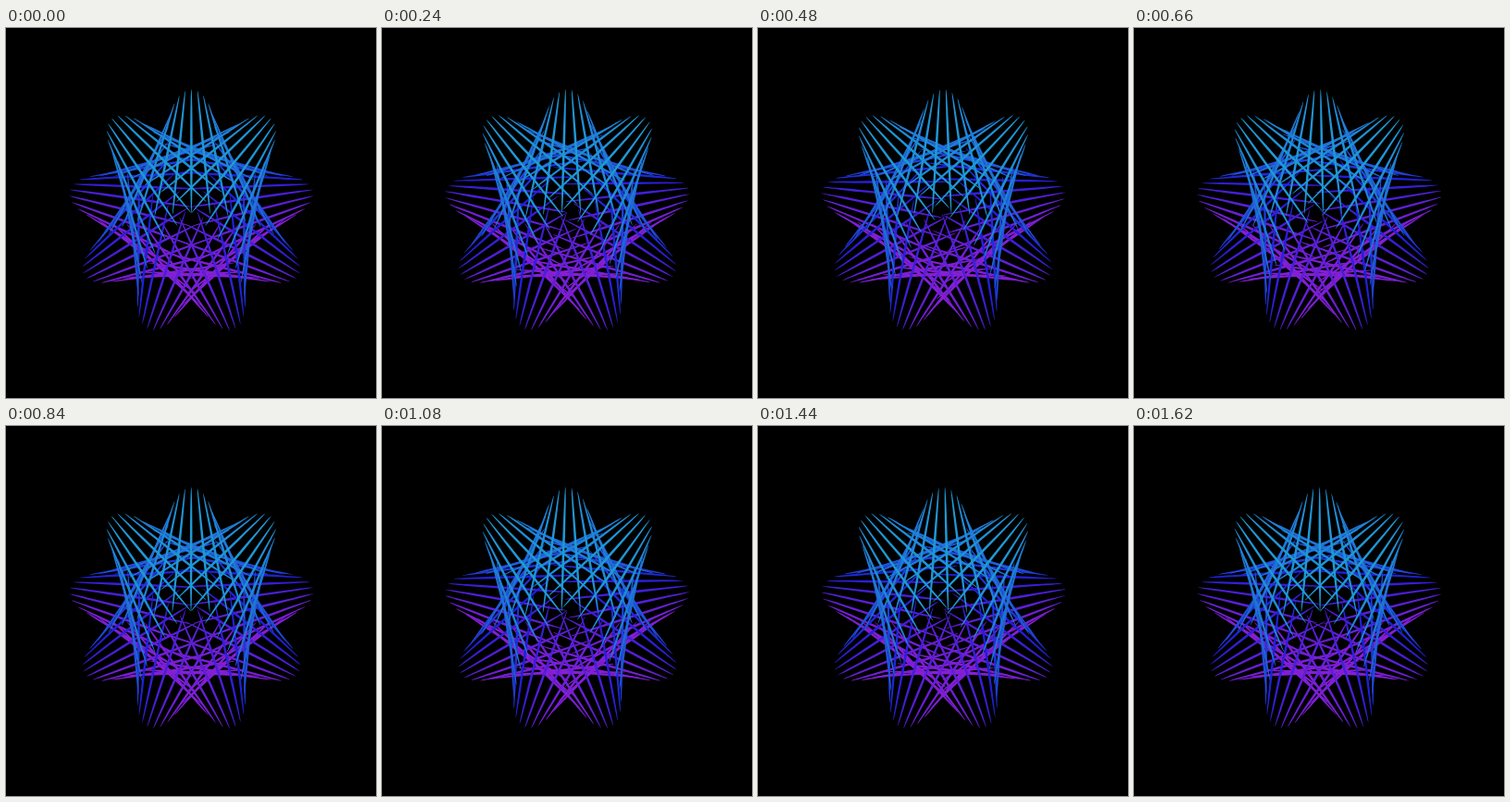
Animation, 400 px wide and 400 px high, one loop 1650 ms. Source, as an HTML page with a canvas:

```html
<!DOCTYPE html>
<html>
<head>
<meta charset="utf-8">
<style>
html, body { margin: 0; width: 100%; height: 100%; overflow: hidden; background: #000; }
canvas { display: block; width: 400px; height: 400px; }
</style>
</head>
<body>
<canvas id="stage" width="400" height="400"></canvas>
<script>
const ctx = document.getElementById('stage').getContext('2d');
const LOOP = 1650;
const STEP = 30;
const HALF = 67;           // half needle length, also the radius of its orbit
const THICK = 1.3;         // half needle thickness
const PER_LAYER = 31;
const SPACING = 360 / PER_LAYER;
const LAYER_TURNS = [-40, 40, 0];
const rad = deg => deg * Math.PI / 180;

// Signed angle in (-180, 180]
const wrap = deg => deg - 360 * Math.ceil((deg - 180) / 360);

function drawNeedle({ orbit, turn }) {
  const hue = 237 - 37 * Math.cos(rad(orbit));
  ctx.save();
  ctx.rotate(rad(turn + orbit));
  ctx.translate(0, -HALF);
  ctx.rotate(rad(-1.5 * orbit));   // counter-spin at half the orbit speed
  ctx.fillStyle = `hsl(${hue}, 75%, 48%)`;
  ctx.beginPath();
  ctx.ellipse(0, 0, THICK, HALF, 0, 0, 2 * Math.PI);
  ctx.fill();
  ctx.restore();
}

function draw(time) {
  const progress = Math.floor((time % LOOP) / STEP) * STEP / LOOP;
  const needles = [];
  for (const turn of LAYER_TURNS) {
    for (let i = 0; i < PER_LAYER; i++) {
      // Each needle advances by two places per loop
      needles.push({ turn, orbit: wrap((i - 2 * progress) * SPACING) });
    }
  }
  // Purple needles lie underneath, cyan ones on top
  needles.sort((a, b) => Math.abs(b.orbit) - Math.abs(a.orbit));

  ctx.setTransform(1, 0, 0, 1, 0, 0);
  ctx.fillStyle = '#000';
  ctx.fillRect(0, 0, 400, 400);
  ctx.translate(200.4, 200.2);
  needles.forEach(drawNeedle);
}

const start = performance.now();
function tick() {
  draw(performance.now() - start);
  requestAnimationFrame(tick);
}
tick();
</script>
</body>
</html>
```
